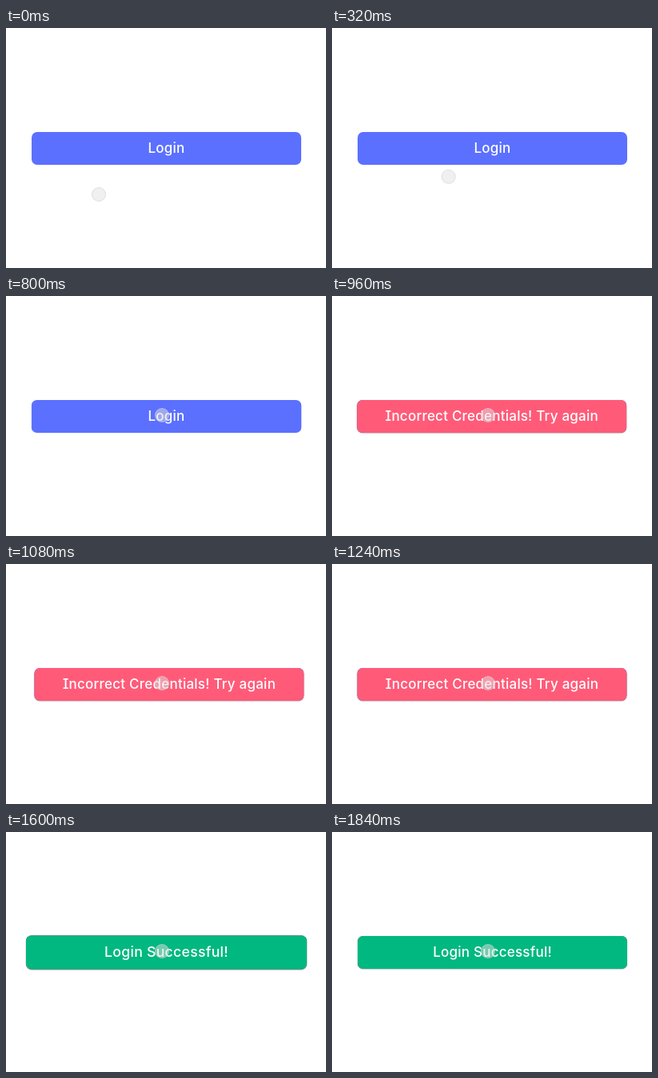
An HTML page that plays this animation: 400 by 300 pixels, repeating every 2 s.

```html
<!DOCTYPE html>
<html lang="en">
<head>
<meta charset="utf-8">
<title>Login button</title>
<style>
  html, body { margin: 0; width: 100%; height: 100%; overflow: hidden; background: #fff; }
  #stage { position: relative; width: 400px; height: 300px; overflow: hidden; }
  #button { position: absolute; left: 32px; top: 130px; width: 337px; height: 41px; }
  .face {
    position: absolute; inset: 0; border-radius: 7px; color: #fff; text-align: center;
    font: 500 17px/41px Inter, Roboto, sans-serif; letter-spacing: .23px;
    font-feature-settings: "cv08"; white-space: nowrap;
  }
  #idle { background: #5b70ff; }
  #error { background: #ff5b79; opacity: 0; box-shadow: 0 .5px 1px rgba(80, 60, 80, .5); }
  #success { background: #00b880; opacity: 0; }
  #pointer {
    position: absolute; left: 107px; top: 199px; width: 18px; height: 18px;
    box-sizing: border-box; border-radius: 50%;
    background: rgba(225, 225, 225, .5); border: 1px solid rgba(205, 205, 205, .5);
  }
</style>
</head>
<body>
<div id="stage">
  <div id="button">
    <div class="face" id="idle">Login</div>
    <div class="face" id="error">Incorrect Credentials! Try again</div>
    <div class="face" id="success">Login Successful!</div>
  </div>
  <div id="pointer"></div>
</div>
<script>
  const LOOP = 2000, STEP = 40;

  // Each step is [time in ms, value]; the last value holds until the loop ends.
  function track(id, prop, steps, easing) {
    const frames = steps.map(([time, value]) => ({ offset: time / LOOP, [prop]: value, easing }));
    frames.push({ offset: 1, [prop]: steps[steps.length - 1][1] });
    const anim = document.getElementById(id).animate(frames, { duration: LOOP, iterations: Infinity });
    anim.pause();
    return anim;
  }

  const tracks = [
    track("pointer", "translate", [[0, "0px 0px"], [750, "79px -59px"]], "ease-in-out"),
    track("button", "scale", [
      [0, 1], [780, 1], [860, 1.015], [940, 1],
      [1490, 1], [1580, 1.045], [1690, 1]
    ], "ease-in-out"),
    track("button", "translate", [
      [0, 0], [940, 0], [960, -.8], [1000, -3], [1060, 5],
      [1120, -2], [1180, 2], [1240, -.5], [1320, 0]
    ].map(([time, x]) => [time, x + "px"]), "ease-in-out"),
    track("error", "opacity", [[0, 0], [840, 0], [920, 1]], "linear"),
    track("success", "opacity", [[0, 0], [1520, 0], [1600, 1]], "linear")
  ];

  const start = performance.now();
  function draw() {
    const elapsed = (performance.now() - start) % LOOP;
    const time = Math.floor(elapsed / STEP) * STEP;
    for (const anim of tracks) anim.currentTime = time;
    requestAnimationFrame(draw);
  }
  draw();
</script>
</body>
</html>
```
